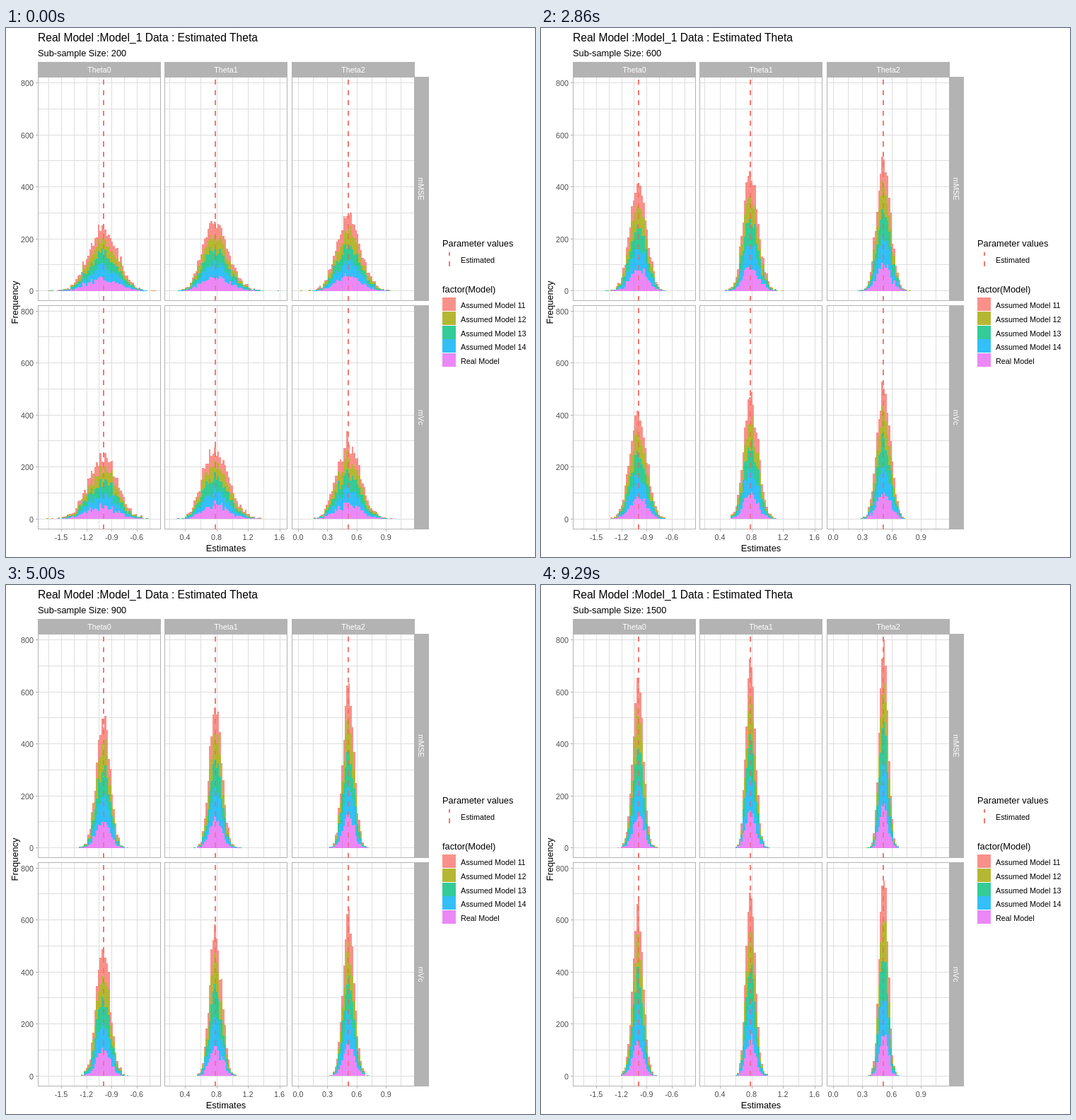
Write an HTML page that moves like this. It is 748 by 748 pixels and loops after 10 s.

```html
<!DOCTYPE html>
<html lang="en">
<head>
<meta charset="utf-8">
<title>Estimated Theta</title>
<style>
  html, body { margin: 0; width: 100%; height: 100%; overflow: hidden; background: #fff; }
  svg { display: block; width: 748px; height: 748px; font-family: "Liberation Sans", Arial, sans-serif; }
  rect, path, line { shape-rendering: crispEdges; }
  .state { visibility: hidden; animation: show 10s step-end infinite; }
  @keyframes show {
    0% { visibility: visible; }
    7.142857% { visibility: hidden; }
  }
</style>
</head>
<body>
<svg id="chart" viewBox="0 0 748 748"></svg>
<script>
const svg = document.getElementById('chart');
const LOOP = 10000, STATES = 14;
const GREY = '#b3b3b3', GRID = '#dedede', LINE = '#f8766d';
const Y_SCALE = 0.3675, BIN = 2.42, DRAWS = 1000;

const models = [
  ['Assumed Model 11', '#f8766d'],
  ['Assumed Model 12', '#a3a500'],
  ['Assumed Model 13', '#00bf7d'],
  ['Assumed Model 14', '#00b0f6'],
  ['Real Model', '#e76bf3'],
];
// tick: first labelled x, step: distance between labels, mark: dashed line
const columns = [
  { name: 'Theta0', x: 45, tick: 78, step: 35.6, labels: ['-1.5', '-1.2', '-0.9', '-0.6'],
    mark: 138, mean: 137.3, sd: [20.2, 20.5], skew: -0.2 },
  { name: 'Theta1', x: 224, tick: 253, step: 44.5, labels: ['0.4', '0.8', '1.2', '1.6'],
    mark: 296, mean: 296.5, sd: [18.3, 18.1], skew: 0.8 },
  { name: 'Theta2', x: 404, tick: 413, step: 41.4, labels: ['0.0', '0.3', '0.6', '0.9'],
    mark: 484, mean: 484.4, sd: [16.8, 16.7], skew: 0.3 },
];
const rows = [
  { name: 'mMSE', y: 69, zero: 371.5 },
  { name: 'mVc', y: 392, zero: 694 },
];
const W = 174, H = 317;

function add(parent, tag, attrs, content = '') {
  const el = document.createElementNS(svg.namespaceURI, tag);
  for (const key in attrs) el.setAttribute(key, attrs[key]);
  el.textContent = content;
  return parent.appendChild(el);
}
const rect = (x, y, width, height, fill, extra) =>
  add(svg, 'rect', { x, y, width, height, fill, ...extra });
const text = (parent, content, x, y, size, fill = '#000', anchor = 'start', turn = 0) =>
  add(parent, 'text', {
    x, y, fill, 'font-size': size, 'text-anchor': anchor,
    transform: `rotate(${turn} ${x} ${y})`,
  }, content);
const dashed = (x, bottom, top, opacity) =>
  add(svg, 'line', {
    x1: x, x2: x, y1: bottom, y2: top, opacity,
    stroke: LINE, 'stroke-width': 2, 'stroke-dasharray': 7.28,
  });

function drawPanel(col, row) {
  for (let k = 0; k <= 8; k++) {
    rect(col.x, Math.floor(row.zero - k * 100 * Y_SCALE), W, 1, GRID);
  }
  for (let k = -1; k < 9; k++) {
    const x = Math.round(col.tick + k * col.step / 2);
    if (x > col.x + 3 && x < col.x + W - 3) rect(x, row.y, 1, H, GRID);
  }
  rect(col.x + 0.5, row.y + 0.5, W - 1, H - 1, 'none', { stroke: GREY });
}

function drawMarks(opacity) {
  for (const row of rows) for (const col of columns) {
    dashed(col.mark, row.y + H, row.y + 1, opacity);
  }
}

function drawAxes() {
  for (const col of columns) {
    rect(col.x, 48, W, 21, GREY);
    text(svg, col.name, col.x + W / 2, 63, 10.8, '#fff', 'middle');
    col.labels.forEach((label, k) => {
      const x = col.tick + k * col.step;
      rect(Math.round(x), 709, 1, 3, GREY);
      text(svg, label, x, 724, 10.8, '#4d4d4d', 'middle');
    });
  }
  for (const row of rows) {
    rect(577, row.y, 21, H, GREY);
    text(svg, row.name, 583, row.y + H / 2, 10.8, '#fff', 'middle', 90);
    for (let v = 0; v <= 800; v += 200) {
      const y = Math.floor(row.zero - v * Y_SCALE);
      rect(42, y, 3, 1, GREY);
      text(svg, v, 39, y + 5, 10.8, '#4d4d4d', 'end');
    }
  }
  text(svg, 'Real Model :Model_1 Data : Estimated Theta', 45, 19, 15.6);
  text(svg, 'Estimates', 311, 740, 12.9, '#000', 'middle');
  text(svg, 'Frequency', 17, 388, 12.9, '#000', 'middle', -90);
}

function drawLegend() {
  text(svg, 'Parameter values', 617, 309, 12.8);
  dashed(627, 337, 317, 1);
  text(svg, 'Estimated', 643, 332, 10.8);
  text(svg, 'factor(Model)', 617, 374, 12.8);
  models.forEach(([name, color], k) => {
    const y = Math.round(381 + k * 19.75);
    rect(617, y, 19, 19, color, { 'fill-opacity': 0.8 });
    text(svg, name, 643, y + 15, 10.8);
  });
}

function randomNormal(seed) {
  const uniform = () => {
    seed = (seed + 0x6d2b79f5) | 0;
    let t = Math.imul(seed ^ (seed >>> 15), 1 | seed);
    t = (t + Math.imul(t ^ (t >>> 7), 61 | t)) ^ t;
    return ((t ^ (t >>> 14)) >>> 0) / 4294967296;
  };
  return () => Math.sqrt(-2 * Math.log(1 - uniform())) * Math.cos(2 * Math.PI * uniform());
}

// Stacked histogram of simulated estimates; the spread shrinks with the sample size.
function histogram(col, row, rowIndex, size, normal, paths) {
  const shrink = Math.sqrt(200 / size);
  const bins = Math.ceil(W / BIN);
  const base = new Array(bins).fill(0);
  for (let m = models.length - 1; m >= 0; m--) {
    const counts = new Array(bins).fill(0);
    for (let i = 0; i < DRAWS; i++) {
      const z = normal() * shrink;
      const x = col.mean + col.sd[rowIndex] * z + col.skew * z * z;
      const b = Math.floor((x - col.x) / BIN);
      if (b >= 0 && b < bins) counts[b]++;
    }
    counts.forEach((count, b) => {
      if (!count) return;
      const left = Math.round(col.x + b * BIN), right = Math.round(col.x + (b + 1) * BIN);
      const bottom = Math.round(row.zero - base[b] * Y_SCALE);
      base[b] += count;
      const top = Math.round(row.zero - base[b] * Y_SCALE);
      paths[m] += `M${left} ${bottom}V${top}H${right}V${bottom}Z`;
    });
  }
}

function drawState(index) {
  const size = 200 + index * 100;
  const normal = randomNormal(size);
  const paths = models.map(() => '');
  rows.forEach((row, r) => columns.forEach(col => histogram(col, row, r, size, normal, paths)));
  const group = add(svg, 'g', { class: 'state' });
  group.style.animationDelay = `${(index / STATES - 1) * LOOP - 5}ms`;
  models.forEach(([, fill], m) => add(group, 'path', { d: paths[m], fill, 'fill-opacity': 0.8 }));
  text(group, `Sub-sample Size: ${size}`, 45, 39.5, 12.8);
}

for (const row of rows) for (const col of columns) drawPanel(col, row);
drawAxes();
drawLegend();
drawMarks(1);
for (let i = 0; i < STATES; i++) drawState(i);
drawMarks(0.5);
</script>
</body>
</html>
```
